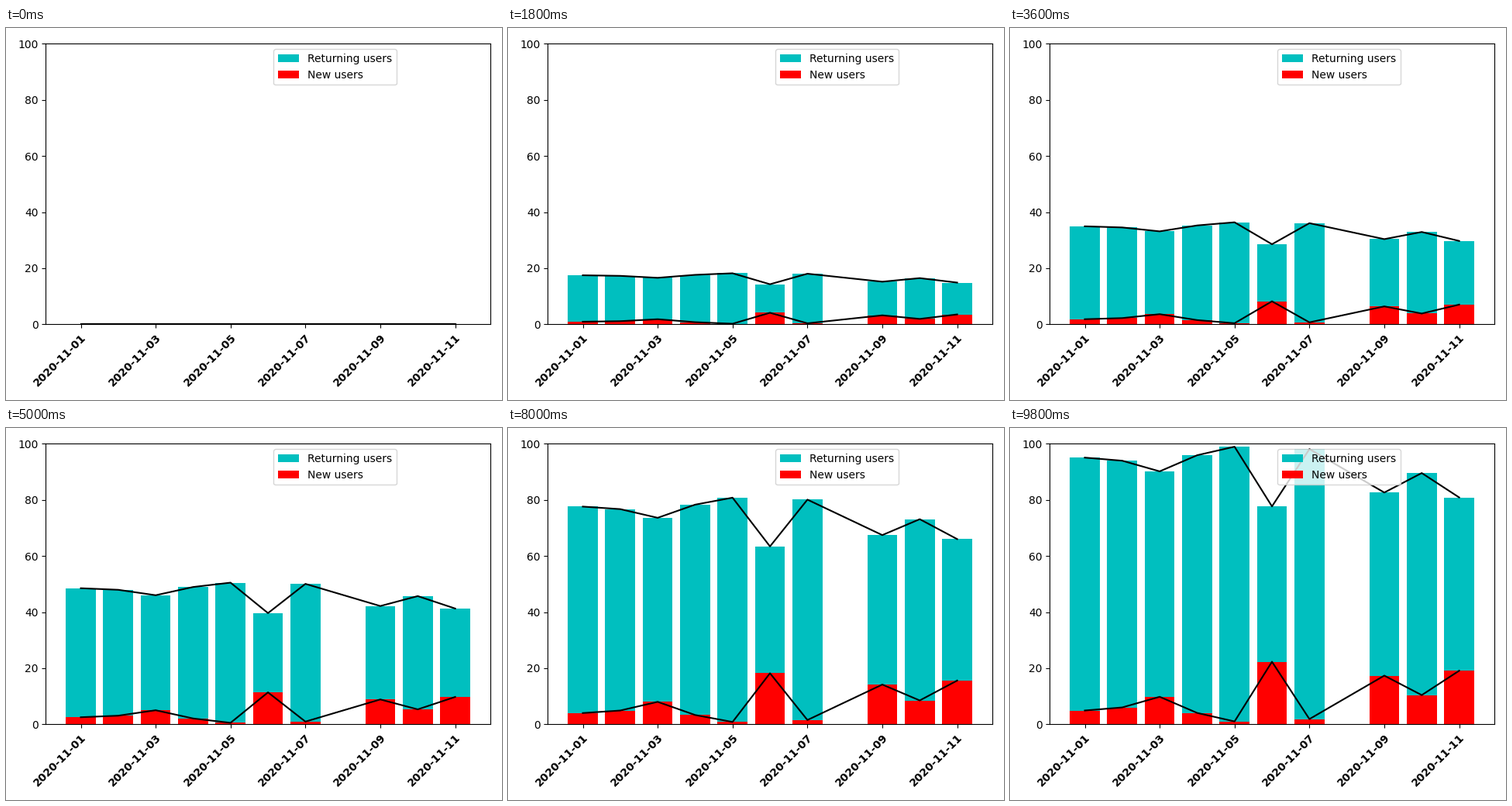
Animation, 640 px wide and 480 px high, one loop 10000 ms. Source, as a matplotlib script:

```python
import numpy as np
import matplotlib.pyplot as plt
from matplotlib.animation import FuncAnimation

FRAMES = 50
INTERVAL = 200

# The eighth day has no data.
days = np.array([1, 2, 3, 4, 5, 6, 7, 9, 10, 11])
new = np.array([4.9, 6.0, 9.8, 4.05, 1.0, 22.3, 1.85, 17.35, 10.4, 19.1])
returning = 100 - new

fig, ax = plt.subplots(figsize=(6.4, 4.8), dpi=100)


def add_series(color, label):
    bars = ax.bar(days, np.zeros(len(days)), color=color, label=label)
    line, = ax.plot(days, np.zeros(len(days)), color="black", lw=1.5)
    return bars, line


series = [
    (returning, *add_series("c", "Returning users")),
    (new, *add_series("r", "New users")),
]

ax.set_xlim(0.06, 11.94)
ax.set_ylim(0, 100)
ticks = range(1, 12, 2)
ax.set_xticks(ticks, [f"2020-11-{d:02d}" for d in ticks], rotation=45,
              ha="right", rotation_mode="anchor", fontweight="bold")
fig.tight_layout()
ax.legend(loc="upper left", bbox_to_anchor=(0.5, 1))


def update(i):
    share = i / (FRAMES - 1)
    artists = []
    for values, bars, line in series:
        heights = values * share
        for bar, height in zip(bars, heights):
            bar.set_height(height)
        line.set_ydata(heights)
        artists += [*bars, line]
    return artists


anim = FuncAnimation(fig, update, frames=FRAMES, interval=INTERVAL,
                     repeat=True, repeat_delay=0, blit=False)
plt.show()
```
